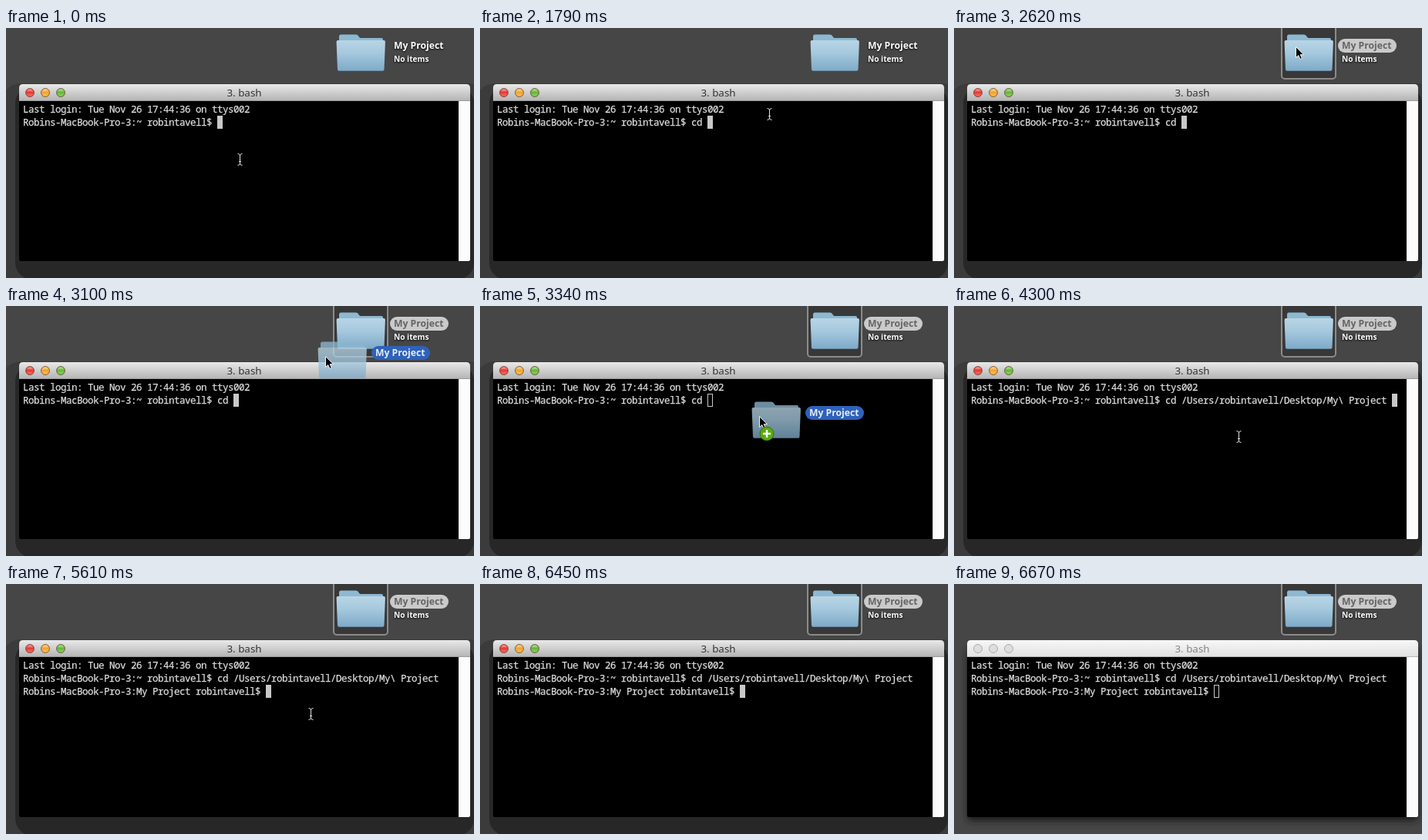
Recreate the animation shown at these times as an HTML page. Size 607 by 325 pixels, loop 6730 ms.

```html
<!DOCTYPE html>
<html lang="en">
<head>
<meta charset="utf-8">
<title>Drag a folder into the terminal</title>
<style>
html, body { margin: 0; width: 100%; height: 100%; overflow: hidden; background: #464646; }
svg { display: block; width: 100%; height: 100%; }
text { white-space: pre; }
.mono { font: 12.5px "Noto Sans Mono", monospace; letter-spacing: -.5px; fill: #dedede; stroke: #dedede; stroke-width: .25; }
.title { font: 13.4px "Noto Sans", sans-serif; text-anchor: middle; }
.label { font: bold 12.2px "Noto Sans", sans-serif; }
.info { font: bold 10.1px "Noto Sans", sans-serif; fill: #fff; }
.shaded { filter: drop-shadow(0 1px 1px #000); }
</style>
</head>
<body>
<svg viewBox="0 0 607 325" preserveAspectRatio="none">
  <defs>
    <linearGradient id="bar" x2="0" y2="1"><stop stop-color="#e9e9e9"/><stop offset="1" stop-color="#b3b3b3"/></linearGradient>
    <linearGradient id="paleBar" x2="0" y2="1"><stop stop-color="#f7f7f7"/><stop offset="1" stop-color="#e0e0e0"/></linearGradient>
    <linearGradient id="front" x2="0" y2="1"><stop stop-color="#b9d5e5"/><stop offset=".4" stop-color="#a6c9de"/><stop offset="1" stop-color="#7eaac8"/></linearGradient>
    <linearGradient id="gloss" x2="0" y2="1"><stop stop-color="#fff" stop-opacity=".6"/><stop offset=".45" stop-color="#fff" stop-opacity="0"/><stop offset="1" stop-color="#fff" stop-opacity=".3"/></linearGradient>
    <filter id="soft" x="-10%" y="-10%" width="120%" height="120%"><feGaussianBlur stdDeviation="4"/></filter>
    <g id="folder">
      <path d="M432 20V11q0-2.500 2.500-2.500H454q2.500 0 3.500 2.500t3 2H487q2 0 2 2v5z" fill="#8db8d2"/>
      <path d="M430.500 16H490q2 0 1.900 2L490.500 54q-.2 1.800-2 1.800H432q-1.800 0-2-1.800L428.600 18q0-2 1.900-2z" fill="url(#front)"/>
    </g>
  </defs>

  <rect width="607" height="325" fill="#464646"/>

  <g id="selection">
    <rect x="425" y="-4" width="70" height="70" rx="4" fill="#383838" stroke="#8b8b8b" stroke-width="2"/>
    <rect x="498" y="14" width="76" height="18" rx="9" fill="#cacaca"/>
  </g>
  <use href="#folder"/>
  <text id="folderName" class="label" x="503" y="27">My Project</text>
  <text class="info shaded" x="503" y="44">No items</text>

  <g id="activeShadow">
    <rect x="-5" y="72" width="629" height="280" rx="24" fill="#3b3b3b"/>
    <rect x="12" y="76" width="595" height="251" rx="22" fill="#272727"/>
  </g>
  <rect id="paleShadow" x="17" y="84" width="585" height="224" rx="5" fill="#1c1c1c" filter="url(#soft)"/>

  <path id="titleBar" d="M17 95V78q0-5 5-5H597q5 0 5 5V95z"/>
  <path d="M17 94.500H602" stroke="#777" stroke-opacity=".4"/>
  <g id="lights"></g>
  <text id="windowTitle" class="title" x="309" y="89">3. bash</text>
  <path d="M17 95H602V301q0 2-2 2H19q-2 0-2-2z" fill="#000"/>
  <path d="M587 95H602V301q0 2-2 2H587z" fill="#fcfcfc"/>
  <text class="mono" x="22" y="110">Last login: Tue Nov 26 17:44:36 on ttys002</text>
  <text id="firstLine" class="mono" x="22" y="127"></text>
  <text id="secondLine" class="mono" x="22" y="144"></text>
  <rect id="caret" stroke="#c8c8c8" width="6" height="16"/>

  <g id="ghost">
    <use href="#folder" opacity=".77"/>
    <rect x="498" y="14" width="76" height="18" rx="9" fill="#2e62bb"/>
    <text class="label" x="503" y="27" fill="#e4ebf6">My Project</text>
  </g>

  <g id="pointer">
    <path id="beam" d="M-2.500-7.500Q.5-7.500.5-5Q.5-7.500 3.500-7.500M.5-5V5M-1 2.500H2M-2.500 7.500Q.5 7.500.5 5Q.5 7.500 3.500 7.500" fill="none" stroke="#e0e0e0"/>
    <path id="arrow" d="M.5.5V14.500L3.700 11.600L6 16.500L8.400 15.500L6.200 10.700H10.500z" fill="#000" stroke="#f2f2f2"/>
    <g id="badge">
      <circle cx="10" cy="23" r="9" fill="#58ab0c" stroke="#2f6505" stroke-width=".8"/>
      <path d="M5 23H15M10 18V28" stroke="#fff" stroke-width="2.500"/>
    </g>
  </g>
</svg>
<script>
const LOOP = 6730, CHAR = 7, LINE = 17;
const SELECT = 2500, DRAG = 2980, OVER_TERMINAL = 3220, DROP = 3820, ENTER = 4900, BLUR = 6670;
const GRAB = [438, 27];
const host = "Robins-MacBook-Pro-3:", user = "robintavell";
const prompt = folder => `${host}${folder} ${user}$ `;

// [time, typed command]
const typing = [
  [0, ""], [840, "c"], [1200, "cd"], [1440, "cd "],
  [DROP, `cd /Users/${user}/Desktop/My\\ Project `]
];
// [time, x, y, shape]
const moves = [
  [0, 303, 171, "beam"], [1560, 318, 159, "beam"], [1670, 344, 138, "beam"],
  [1790, 375, 112, "beam"], [1910, 408, 78, "arrow"], [2030, 433, 51, "arrow"],
  [2150, 443, 37, "arrow"], [2270, 445, 29, "arrow"], [2390, 444, 25, "arrow"],
  [2620, 443, 24, "arrow"], [DRAG, 430, 42, "arrow"], [3100, 414, 65, "arrow"],
  [3220, 386, 105, "arrow"], [3340, 362, 143, "arrow"], [3460, 353, 153, "arrow"],
  [3580, 350, 156, "arrow"], [4180, 362, 165, "beam"], [4300, 369, 170, "beam"],
  [5610, 395, 169, "beam"], [5730, 436, 197, "beam"], [5850, 481, 238, "beam"],
  [5970, 520, 274, "beam"], [6090, 546, 303, "arrow"], [6210, 560, 314, "arrow"],
  [6330, 560, 319, "arrow"], [6450, 560, 340, "arrow"]
];

const $ = id => document.getElementById(id);
const set = (id, attrs) => Object.entries(attrs).forEach(([key, value]) => $(id).setAttribute(key, value));
const show = (id, visible) => { $(id).style.display = visible ? "" : "none"; };
const at = (steps, t) => steps.findLast(step => step[0] <= t);

const lightColors = ["#e8382e", "#f0a428", "#62b830"];
function drawLights(active) {
  $("lights").innerHTML = lightColors.map((color, i) => `
    <g transform="translate(${31 + 20 * i} 84)">
      <circle r="5.500" fill="${active ? color : "#dedede"}" stroke="${active ? "#6b4a3c" : "#999"}" stroke-opacity=".75"/>
      ${active ? '<circle r="4.500" fill="url(#gloss)"/>' : ""}
    </g>`).join("");
}

function drawWindow(active) {
  show("activeShadow", active);
  show("paleShadow", !active);
  set("titleBar", { fill: active ? "url(#bar)" : "url(#paleBar)" });
  set("windowTitle", { fill: active ? "#333" : "#858585" });
  drawLights(active);
}

function drawTerminal(t) {
  const entered = t >= ENTER;
  const first = prompt("~") + at(typing, t)[1];
  const second = entered ? prompt("My Project") : "";
  const hollow = t >= BLUR || (t >= OVER_TERMINAL && t < DROP);
  $("firstLine").textContent = first;
  $("secondLine").textContent = second;
  set("caret", {
    x: 22.5 + CHAR * (entered ? second : first).length,
    y: 114.5 + (entered ? LINE : 0),
    fill: hollow ? "none" : "#c8c8c8"
  });
}

function drawFolder(t) {
  const selected = t >= SELECT;
  show("selection", selected);
  set("folderName", { fill: selected ? "#656565" : "#fff", class: selected ? "label" : "label shaded" });
}

function drawPointer(t) {
  const [, x, y, shape] = at(moves, t);
  const dragging = t >= DRAG && t < DROP;
  set("pointer", { transform: `translate(${x} ${y})` });
  show("beam", shape === "beam");
  show("arrow", shape === "arrow");
  show("badge", dragging && t >= OVER_TERMINAL);
  show("ghost", dragging);
  set("ghost", { transform: `translate(${x - GRAB[0]} ${y - GRAB[1]})` });
}

let start;
let wasActive;
function frame(now) {
  start ??= now;
  const t = (now - start) % LOOP;
  const active = t < BLUR;
  if (active !== wasActive) drawWindow(wasActive = active);
  drawTerminal(t);
  drawFolder(t);
  drawPointer(t);
  requestAnimationFrame(frame);
}
requestAnimationFrame(frame);
</script>
</body>
</html>
```
